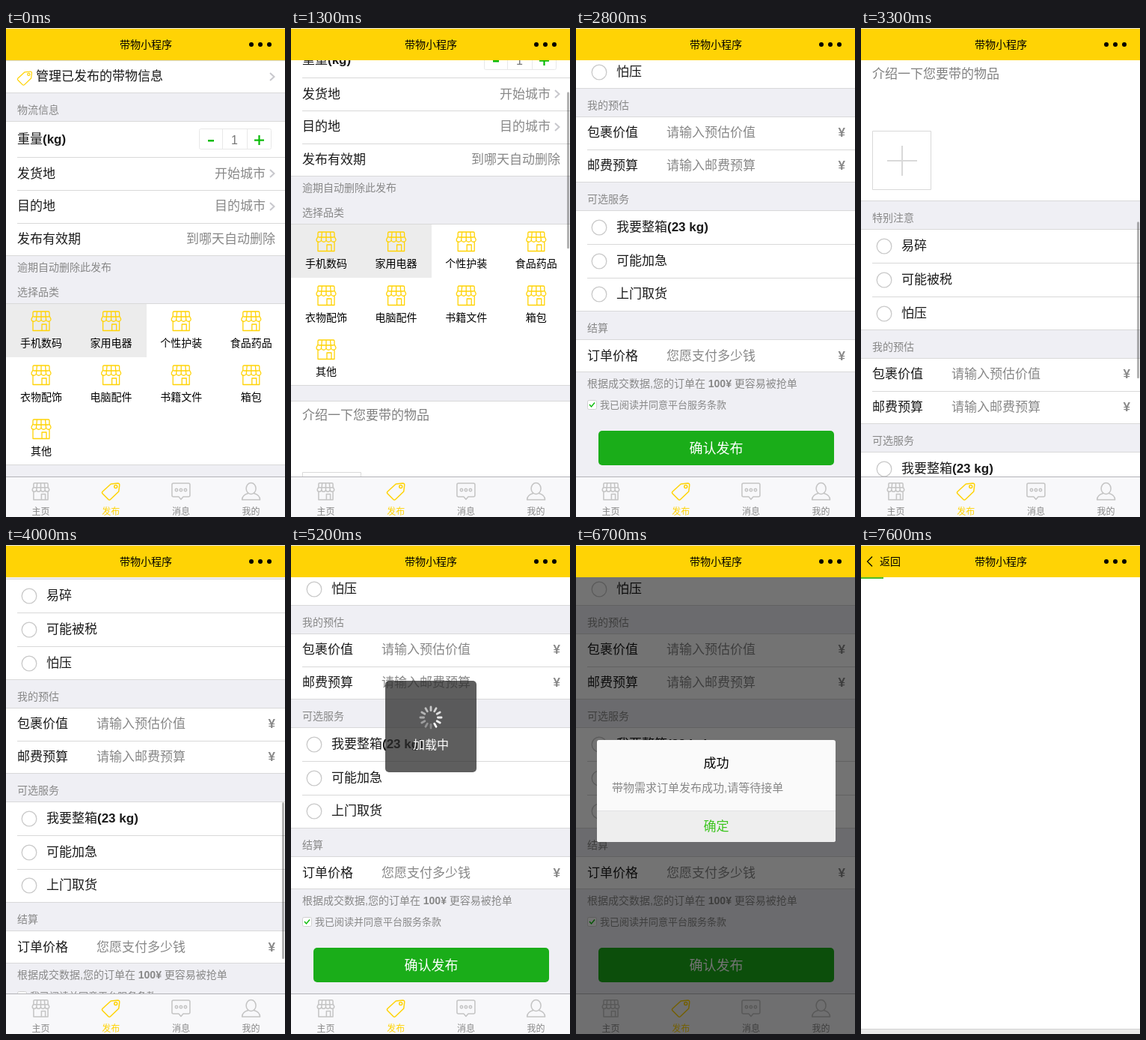
Write an HTML page with a canvas that moves like this. It is 373x652 px and loops after 8000 ms.

```html
<!DOCTYPE html>
<html lang="zh-CN">
<head>
<meta charset="utf-8">
<title>带物小程序</title>
<style>
html, body { margin: 0; width: 100%; height: 100%; overflow: hidden; background: #fff; }
canvas { display: block; width: 373px; height: 652px; }
</style>
</head>
<body>
<canvas id="stage"></canvas>
<script>
const W = 373, H = 652, LOOP = 8000;
const TOP = 43, TAB = 598, MAX = 883;
const YELLOW = '#ffd305', GREEN = '#1aad19', BG = '#efeff4';
const LINE = '#d9d9d9', GREY = '#888', INK = '#1a1a1a', ICON = '#c4c4c4';
const FONT = '"Liberation Sans", "Noto Sans CJK SC", "Noto Sans CJK", sans-serif';

const canvas = document.getElementById('stage');
const ctx = canvas.getContext('2d');
const dpr = window.devicePixelRatio || 1;
canvas.width = W * dpr;
canvas.height = H * dpr;

// [time, value] keys
const SCROLL = [
  [1100, 0], [1200, 29], [1300, 106], [1400, 182], [1500, 182], [1600, 268],
  [1900, 523], [2000, 710], [2100, MAX], [2900, MAX], [3000, 860], [3300, 561],
  [3400, 545], [3500, 540], [3600, 540], [3700, 600], [3800, 680], [3900, 680],
  [4000, 784], [4100, 850], [4200, MAX]
];
const BAR = [
  [1100, 0], [1200, 1], [2500, 1], [2800, 0], [2900, 0], [3000, 1], [4600, 1], [4900, 0]
];
const TOAST = [[4700, 0], [4900, 1], [5500, 1], [5600, 0]];
const MODAL = [[5500, 0], [5900, 1], [7000, 1], [7100, 0]];
const NEXT = [[7200, 0], [7300, .4], [7400, .8], [7500, .95], [7600, 1]];

function at(keys, t) {
  if (t <= keys[0][0]) return keys[0][1];
  for (let i = 1; i < keys.length; i++) {
    const [t0, a] = keys[i - 1], [t1, b] = keys[i];
    if (t <= t1) return a + (b - a) * (t - t0) / (t1 - t0);
  }
  return keys[keys.length - 1][1];
}

function rect(x, y, w, h, color) {
  ctx.fillStyle = color;
  ctx.fillRect(x, y, w, h);
}

function box(x, y, w, h, r, fill, stroke) {
  ctx.beginPath();
  ctx.roundRect(x, y, w, h, r);
  paint(fill, stroke);
}

function paint(fill, stroke, width = 1) {
  if (fill) { ctx.fillStyle = fill; ctx.fill(); }
  if (stroke) { ctx.strokeStyle = stroke; ctx.lineWidth = width; ctx.stroke(); }
}

function circle(x, y, r, fill, stroke, width) {
  ctx.beginPath();
  ctx.arc(x, y, r, 0, Math.PI * 2);
  paint(fill, stroke, width);
}

function path(points, color, width = 1) {
  ctx.beginPath();
  points.forEach(([x, y]) => ctx.lineTo(x, y));
  paint(null, color, width);
}

// y is the middle of the glyphs
function text(str, x, y, size, color, align = 'left', weight = 'normal') {
  ctx.font = `${weight} ${size}px ${FONT}`;
  ctx.textAlign = align;
  ctx.fillStyle = color;
  ctx.fillText(str, x, y + size * .38);
  return x + ctx.measureText(str).width;
}

function icon(x, y, scale, color, width, draw) {
  ctx.save();
  ctx.translate(x, y);
  ctx.scale(scale, scale);
  ctx.lineJoin = ctx.lineCap = 'round';
  ctx.beginPath();
  draw();
  paint(null, color, width / scale);
  ctx.restore();
}

function shop() {
  ctx.roundRect(-11, -13, 22, 7, 1.5);
  ctx.moveTo(-11, -7); ctx.lineTo(-13, -3);
  ctx.moveTo(11, -7); ctx.lineTo(13, -3);
  for (let x = -5.5; x < 6; x += 5.5) { ctx.moveTo(x, -13); ctx.lineTo(x * 1.18, -3); }
  for (let i = 0; i < 4; i++) {
    const x = -9.75 + i * 6.5;
    ctx.moveTo(x + 3.25, -3);
    ctx.arc(x, -3, 3.25, 0, Math.PI);
  }
  ctx.moveTo(-11, 0); ctx.lineTo(-11, 12.5); ctx.lineTo(11, 12.5); ctx.lineTo(11, 0);
  ctx.moveTo(1, 12.5); ctx.lineTo(1, 4); ctx.lineTo(7, 4); ctx.lineTo(7, 12.5);
}

function tag() {
  ctx.moveTo(0, -10);
  ctx.lineTo(9, -11);
  ctx.quadraticCurveTo(12, -11, 11.5, -8);
  ctx.lineTo(10.5, 0);
  ctx.lineTo(-.5, 10.5);
  ctx.quadraticCurveTo(-2, 12, -3.5, 10.5);
  ctx.lineTo(-11, 3);
  ctx.quadraticCurveTo(-12.5, 1.5, -11, 0);
  ctx.closePath();
  ctx.moveTo(8.5, -6.5);
  ctx.arc(6.5, -6.5, 2, 0, Math.PI * 2);
}

function chat() {
  ctx.moveTo(-3, 7); ctx.lineTo(-10, 7);
  ctx.quadraticCurveTo(-12, 7, -12, 5);
  ctx.lineTo(-12, -9);
  ctx.quadraticCurveTo(-12, -11, -10, -11);
  ctx.lineTo(10, -11);
  ctx.quadraticCurveTo(12, -11, 12, -9);
  ctx.lineTo(12, 5);
  ctx.quadraticCurveTo(12, 7, 10, 7);
  ctx.lineTo(3, 7); ctx.lineTo(0, 10.5); ctx.closePath();
  for (const x of [-6, 0, 6]) { ctx.moveTo(x + 1.7, -2); ctx.arc(x, -2, 1.7, 0, Math.PI * 2); }
}

function person() {
  ctx.ellipse(0, -4, 6.5, 7.5, 0, 0, Math.PI * 2);
  ctx.moveTo(-4, 2.5);
  ctx.bezierCurveTo(-9, 4, -12, 6, -12, 11);
  ctx.lineTo(12, 11);
  ctx.bezierCurveTo(12, 6, 9, 4, 4, 2.5);
}

// White block with rules above and below, and inset rules between rows
function block(y0, y1, seps = []) {
  rect(0, y0, W, y1 - y0, '#fff');
  rect(0, y0, W, 1, LINE);
  rect(0, y1, W, 1, LINE);
  seps.forEach(y => rect(15, y, W - 15, 1, LINE));
}

const heading = (str, y) => text(str, 15, y, 14, GREY);
const label = (str, y) => text(str, 15, y, 17, INK);
const arrow = y => path([[353, y - 5], [358.5, y], [353, y + 5]], '#c8c8cd', 2);

function choice(str, y, extra) {
  circle(31, y + 1, 9.8, '#fff', '#c9c9c9', 1.3);
  const x = text(str, 54, y, 17, INK);
  if (extra) text(extra, x, y, 17, INK, 'left', 'bold');
}

function field(name, hint, y) {
  label(name, y);
  text(hint, 121, y, 17, GREY);
  text('¥', 360, y, 17, GREY, 'right', 'bold');
}

function logistics() {
  block(TOP, 86);
  icon(25, 67, .82, YELLOW, 1.2, tag);
  text('管理已发布的带物信息', 40, 64, 17, INK);
  arrow(65);

  heading('物流信息', 109);
  block(124, 303, [172, 216, 260]);
  text('(kg)', label('重量', 148), 148, 17, INK, 'left', 'bold');
  box(258.5, 134.5, 96, 27, 2, '#fff', '#e8e8e8');
  rect(289, 135, 1, 27, '#e8e8e8');
  rect(322, 135, 1, 27, '#e8e8e8');
  rect(270, 149, 8, 2.5, '#09bb07');
  text('1', 305.5, 149, 16, '#777', 'center');
  rect(332, 148.5, 13, 2.2, '#09bb07');
  rect(337.4, 143, 2.2, 13, '#09bb07');
  label('发货地', 194);
  label('目的地', 237);
  label('发布有效期', 281);
  text('开始城市', 347, 194, 17, GREY, 'right');
  text('目的城市', 347, 237, 17, GREY, 'right');
  text('到哪天自动删除', 360, 281, 17, GREY, 'right');
  arrow(194);
  arrow(238);
  heading('逾期自动删除此发布', 319);
}

function categories() {
  heading('选择品类', 352);
  block(367, 582);
  rect(0, 368, 188, 71, '#ececec');
  const names = ['手机数码', '家用电器', '个性护装', '食品药品', '衣物配饰', '电脑配件', '书籍文件', '箱包', '其他'];
  names.forEach((name, i) => {
    const x = 47 + (i % 4) * 93.6, y = 391 + Math.floor(i / 4) * 72;
    icon(x, y, 1, YELLOW, 1.3, shop);
    text(name, x, y + 29, 14, '#000', 'center');
  });
}

function details() {
  block(603, 791);
  text('介绍一下您要带的物品', 15, 622, 17, '#808080');
  box(15.5, 698.5, 78, 78, 0, null, LINE);
  rect(35, 737, 40, 2, LINE);
  rect(54, 718, 2, 40, LINE);

  heading('特别注意', 814);
  block(829, 963, [874, 919]);
  choice('易碎', 851);
  choice('可能被税', 896);
  choice('怕压', 941);

  heading('我的预估', 986);
  block(1001, 1088, [1045]);
  field('包裹价值', '请输入预估价值', 1022);
  field('邮费预算', '请输入邮费预算', 1066);

  heading('可选服务', 1111);
  block(1126, 1260, [1171, 1216]);
  choice('我要整箱', 1148, '(23 kg)');
  choice('可能加急', 1193);
  choice('上门取货', 1237);
}

function checkout() {
  heading('结算', 1283);
  block(1298, 1341);
  field('订单价格', '您愿支付多少钱', 1320);
  let x = text('根据成交数据,您的订单在 ', 15, 1357, 14, GREY);
  x = text('100¥', x, 1357, 14, GREY, 'left', 'bold');
  text(' 更容易被抢单', x, 1357, 14, GREY);
  box(15.5, 1379.5, 12, 12, 2, '#fff', '#d1d1d1');
  path([[18, 1385], [20.5, 1388], [25, 1382.5]], '#09bb07', 1.4);
  text('我已阅读并同意平台服务条款', 32, 1385, 13, GREY);
  box(30, 1420, 315, 46, 5, GREEN);
  text('确认发布', 187.5, 1443, 18, '#fff', 'center');
}

function header(back) {
  rect(0, 0, W, TOP, YELLOW);
  rect(0, 0, W, 1, '#e4e4e4');
  text('带物小程序', 187, 22, 14, '#000', 'center');
  for (const x of [328, 340, 352]) circle(x, 22, 3, '#000');
  if (back) {
    path([[15, 15.5], [8.5, 22], [15, 28.5]], '#000', 1.2);
    text('返回', 25, 22, 14, '#000');
  }
}

function tabs() {
  rect(0, TAB, W, H - TAB, '#f8f8fa');
  rect(0, TAB, W, 1, '#b4b4b8');
  [['主页', shop, .87], ['发布', tag, 1], ['消息', chat, 1], ['我的', person, 1]].forEach(([name, draw, scale], i) => {
    const x = 46.5 + i * 93.7, on = i === 1;
    icon(x, 618, scale, on ? YELLOW : ICON, 1.5, draw);
    text(name, x, 644, 12, on ? YELLOW : GREY, 'center');
  });
}

function toast(t) {
  box(126, 181, 122, 122, 5, 'rgba(40,40,40,.75)');
  const alpha = ctx.globalAlpha, head = Math.floor(t * 12 / 1000) + 3;
  for (let i = 0; i < 12; i++) {
    ctx.save();
    ctx.translate(187, 230);
    ctx.rotate(i * Math.PI / 6);
    ctx.globalAlpha = alpha * (1 - ((head - i) % 12 + 12) % 12 * .065);
    box(-1.4, -15.5, 2.8, 7.5, 1.4, '#fff');
    ctx.restore();
  }
  text('加载中', 187, 266, 16, '#fff', 'center');
}

function modal(pressed) {
  rect(0, TOP, W, H - TOP, 'rgba(0,0,0,.55)');
  box(28, 260, 319, 136, 3, '#fafafa');
  text('成功', 187.5, 291, 17, '#000', 'center');
  text('带物需求订单发布成功,请等待接单', 48, 323, 15, GREY);
  if (pressed) box(28, 354, 319, 42, [0, 0, 3, 3], '#eee');
  rect(28, 354, 319, 1, '#e2e2e4');
  text('确定', 187.5, 375, 17, '#3cc51f', 'center');
}

function nextPage(t) {
  rect(0, TOP, W, H - TOP, '#fff');
  rect(0, 645, W, 7, '#e9e9e9');
  rect(0, 645, W, 1, '#d2d2d2');
  header(true);
  rect(0, TOP, at([[7200, 0], [7600, 30]], t), 2, '#4cbb2b');
}

function fade(alpha, draw) {
  if (alpha <= 0) return;
  ctx.save();
  ctx.globalAlpha = alpha;
  draw();
  ctx.restore();
}

function render(t) {
  const scroll = Math.round(at(SCROLL, t));
  ctx.setTransform(dpr, 0, 0, dpr, 0, 0);
  rect(0, 0, W, H, BG);
  ctx.save();
  ctx.translate(0, -scroll);
  logistics();
  categories();
  details();
  checkout();
  ctx.restore();
  fade(at(BAR, t), () => box(369, 45 + scroll * .38, 3, 209, 1.5, 'rgba(0,0,0,.3)'));
  header(false);
  tabs();
  fade(at(TOAST, t), () => toast(t));
  fade(at(MODAL, t), () => modal(t >= 6700));
  fade(at(NEXT, t), () => nextPage(t));
}

// The picture advances ten times a second
function tick() {
  const t = performance.now() % LOOP;
  render(Math.floor(t / 100) * 100);
  requestAnimationFrame(tick);
}
tick();
</script>
</body>
</html>
```
